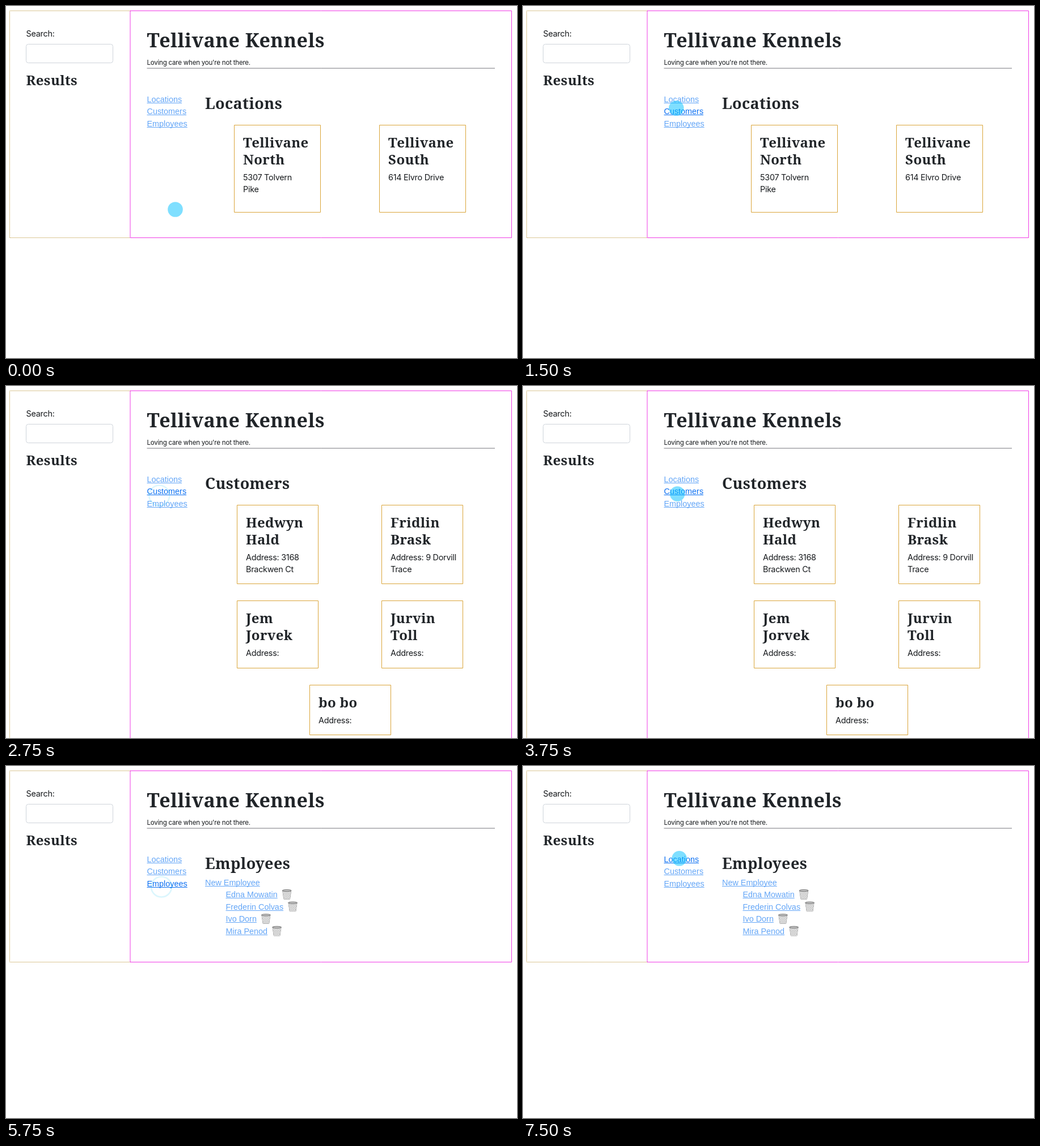
Animation of 901 by 622 pixels, one loop 8 s. Source, as an HTML page with a canvas:

```html
<!DOCTYPE html>
<html lang="en">
<head>
<meta charset="utf-8">
<title>Kennel dashboard</title>
<style>
html, body { margin: 0; width: 100%; height: 100%; overflow: hidden; background: #fff; }
canvas { display: block; }
</style>
</head>
<body>
<canvas id="stage" width="901" height="622"></canvas>
<script>
const ctx = document.getElementById('stage').getContext('2d');
const LOOP = 8000, STEP = 250, CLICK_TIME = 750;
const LINE = 21.6, TITLE_LINE = 29.5;
const LEFT = 248.5, MAIN = 351, RIGHT = 862;
const INK = '#212529', LINK = '#64a6f7', LINK_HOVER = '#0d70f2';
const GOLD = '#daa53a', MAGENTA = '#f03ce6';
const NAV = ['Locations', 'Customers', 'Employees'];

// The pointer rests between a pair of equal waypoints
const PATH = [
  { t: 0, x: 298.5, y: 359.5 },
  { t: 250, x: 298.5, y: 355.5 },
  { t: 750, x: 274.5, y: 260.5 },
  { t: 1500, x: 270.3, y: 180.5 },
  { t: 3250, x: 270.3, y: 180.5 },
  { t: 4250, x: 274, y: 200.5 },
  { t: 6250, x: 274, y: 200.5 },
  { t: 7500, x: 275.6, y: 163.3 }
];
const CLICKS = [2250, 5250];

const VIEWS = [
  { start: 0, bottom: 409.5, draw: locations },
  { start: 2500, bottom: 700, draw: customers },
  { start: 5500, bottom: 346.5, draw: employees }
];

const crisp = v => Math.floor(v) + 0.5;
const ease = u => u / 2 + u * u * (1.5 - u);

function text(str, x, y, font, color, spacing = 0) {
  ctx.font = font;
  ctx.letterSpacing = spacing + 'px';
  ctx.fillStyle = color;
  ctx.fillText(str, x, y);
}

const heading = (str, x, y, size) =>
  text(str, x, y, `800 ${size}px "Noto Serif", serif`, INK, size * 0.014);

const body = (str, x, y, size = 14.4) =>
  text(str, x, y, `${size}px Inter, "Open Sans", sans-serif`, '#16191c', size * -0.018);

// Returns the width of the drawn link
function link(str, x, y, hovered) {
  const base = Math.floor(y);
  text(str, x, base, '14.4px "Liberation Sans", Arial, sans-serif', hovered ? LINK_HOVER : LINK);
  const { width } = ctx.measureText(str);
  ctx.fillRect(x, base + 1, width, 1);
  return width;
}

function line(points, color, { dash = [], width = 1 } = {}) {
  ctx.beginPath();
  points.forEach(([x, y]) => ctx.lineTo(x, y));
  ctx.setLineDash(dash);
  ctx.lineWidth = width;
  ctx.strokeStyle = color;
  ctx.stroke();
  ctx.setLineDash([]);
}

function box(x, y, w, h, color, radius = 0) {
  ctx.beginPath();
  ctx.roundRect(x, y, w, h, radius);
  ctx.lineWidth = 1;
  ctx.strokeStyle = color;
  ctx.stroke();
}

function card({ titles, lines }, center, y, width, height) {
  const x = crisp(center - width / 2), top = crisp(y);
  box(x, top, width, crisp(y + height) - top, GOLD);
  titles.forEach((s, i) => heading(s, x + 15.5, top + 39.5 + i * TITLE_LINE, 24));
  const first = top + 38 + titles.length * TITLE_LINE;
  lines.forEach((s, i) => body(s, x + 15.5, first + i * LINE));
}

// Rows of cards, each row spread evenly over the main column
function cards(rows, width, extra = 0) {
  let y = 210.1;
  for (const row of rows) {
    const { titles, lines } = row[0];
    const height = 37.6 + titles.length * TITLE_LINE + lines.length * LINE + extra;
    const share = (RIGHT - MAIN) / row.length;
    row.forEach((c, i) => card(c, MAIN + share * (i + 0.5), y, width, height));
    y += height + 30;
  }
}

function basket(x, y) {
  const w = 17, h = 17, rim = 2, taper = 2.2;
  const body = [[1, rim], [1 + taper, h], [w - 1 - taper, h], [w - 1, rim]];
  ctx.save();
  ctx.translate(x, y);
  line(body, '#858585');
  ctx.fillStyle = '#eee';
  ctx.fill();
  ctx.save();
  ctx.clip();
  for (let i = -w; i < 2 * w; i += 3) {
    for (const lean of [-11, 11]) line([[i, rim], [i + lean, h]], '#b4b4b4', { width: 0.7 });
  }
  ctx.restore();
  ctx.beginPath();
  ctx.ellipse(w / 2, rim, w / 2 - 0.5, 1.6, 0, 0, Math.PI * 2);
  ctx.fillStyle = '#c4c4c4';
  ctx.fill();
  ctx.strokeStyle = '#707070';
  ctx.lineWidth = 1;
  ctx.stroke();
  ctx.restore();
}

function shell(bottom, hovered) {
  const top = 8.5, split = 219;
  line([[split, top], [6.5, top], [6.5, bottom], [split, bottom]], '#b8912f', { dash: [1, 1] });
  box(split, top, 891.5 - split, bottom - top, MAGENTA);
  body('Search:', 35.5, 53.5);
  box(35.5, 67.5, 153, 33, '#ced4da', 4);
  heading('Results', 35.5, 139.5, 24);
  heading('Tellivane Kennels', LEFT, 73, 34);
  body("Loving care when you're not there.", LEFT, 104, 11.52);
  line([[LEFT, 110], [RIGHT, 110]], '#75757a');
  NAV.forEach((s, i) => link(s, LEFT, 170 + i * LINE, i === hovered));
}

function locations() {
  cards([[
    { titles: ['Tellivane', 'North'], lines: ['5307 Tolvern', 'Pike'] },
    { titles: ['Tellivane', 'South'], lines: ['614 Elvro Drive'] }
  ]], 152, 15);
}

function customers() {
  cards([
    [
      { titles: ['Hedwyn', 'Hald'], lines: ['Address: 3168', 'Brackwen Ct'] },
      { titles: ['Fridlin', 'Brask'], lines: ['Address: 9 Dorvill', 'Trace'] }
    ],
    [
      { titles: ['Jem', 'Jorvek'], lines: ['Address:'] },
      { titles: ['Jurvin', 'Toll'], lines: ['Address:'] }
    ],
    [{ titles: ['bo bo'], lines: ['Address:'] }]
  ], 143);
}

function employees() {
  const top = 211, indent = 387.5;
  link('New Employee', MAIN, top);
  ['Edna Mowatin', 'Frederin Colvas', 'Ivo Dorn', 'Mira Penod'].forEach((name, i) => {
    const y = top + (i + 1) * LINE;
    basket(indent + link(name, indent, y) + 8, y - 14.5);
  });
}

function pointerAt(t) {
  const i = PATH.findLastIndex(p => p.t <= t);
  const a = PATH[i], b = PATH[i + 1] ?? a;
  const u = a === b ? 0 : ease((t - a.t) / (b.t - a.t));
  return { x: a.x + (b.x - a.x) * u, y: a.y + (b.y - a.y) * u };
}

function drawPointer({ x, y }, t) {
  const click = CLICKS.find(c => t >= c && t < c + CLICK_TIME);
  ctx.beginPath();
  if (click === undefined) {
    ctx.arc(x, y, 13.3, 0, Math.PI * 2);
    ctx.fillStyle = 'rgba(0, 191, 255, 0.5)';
    ctx.fill();
  } else {
    const age = (t - click) / CLICK_TIME;
    ctx.arc(x, y + 13, 16 + 3 * age, 0, Math.PI * 2);
    ctx.lineWidth = 2.6;
    ctx.strokeStyle = `rgba(0, 191, 240, ${0.3 - 0.24 * age})`;
    ctx.stroke();
  }
}

function render(now) {
  // The picture advances in fixed steps
  const t = Math.floor((now % LOOP) / STEP) * STEP;
  const pointer = pointerAt(t);
  const hovered = Math.floor((pointer.y - 151.5) / LINE);
  const index = VIEWS.findLastIndex(v => v.start <= t);
  ctx.fillStyle = '#fff';
  ctx.fillRect(0, 0, 901, 622);
  shell(VIEWS[index].bottom, hovered);
  heading(NAV[index], MAIN, 182, 27);
  VIEWS[index].draw();
  drawPointer(pointer, t);
}

const begin = performance.now();
function tick() {
  render(performance.now() - begin);
  requestAnimationFrame(tick);
}
tick();
</script>
</body>
</html>
```
